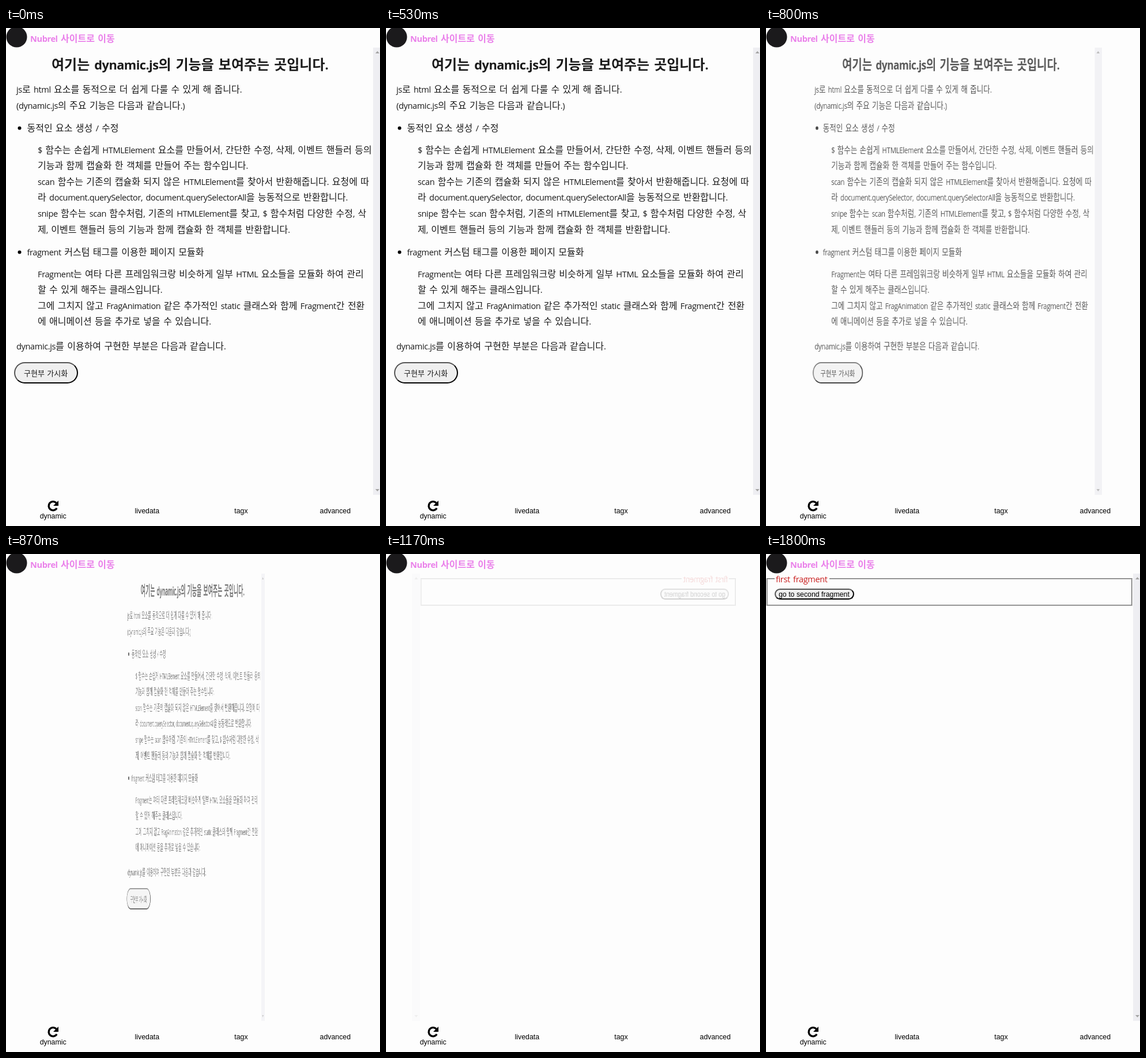
Write an HTML page that moves like this. It is 649 px wide and 863 px high and loops after 1830 ms.

```html
<!DOCTYPE html>
<html lang="ko">
<head>
<meta charset="utf-8">
<title>dynamic.js</title>
<style>
  html, body { margin: 0; width: 100%; height: 100%; overflow: hidden; background: #fdfdfd; }
  body { position: relative; }
  svg { position: absolute; left: 0; top: 0; width: 653px; height: 863px; overflow: visible; }

  /* Hangul and spaces; Latin runs get their own font below */
  text { font: 16px "Noto Sans CJK KR", "Noto Sans CJK", sans-serif; word-spacing: .055em; fill: #1a1a1a; white-space: pre; }
  .latin { font-family: "Open Sans", "Noto Sans", sans-serif; font-size: .91em; letter-spacing: -.026em; }
  .title { font-size: 24px; font-weight: 700; }
  .link { font-weight: 700; fill: #ea80ea; }
  .legend { fill: #c81e1e; }
  .small { font-size: 13px; }
  .ui { font: 12.35px "Liberation Sans", Arial, sans-serif; word-spacing: 0; fill: #000; }
  .nav { text-anchor: middle; }

  .page { position: absolute; left: 0; top: 0; width: 653px; height: 863px; }
  .intro { animation: turn-out 1830ms linear infinite, fade-out 1830ms linear infinite; }
  .fragment { animation: flip-in 1830ms linear infinite; }
  .box { position: absolute; box-sizing: border-box; }
  .button { border: 2px outset #000; background: #efefef; }
  .show { left: 14px; top: 579px; width: 111px; height: 37px; border-radius: 18.5px; }
  .go { left: 15px; top: 60px; width: 138px; height: 19px; border-radius: 9.5px; }
  .fieldset { left: 1px; top: 42px; width: 635px; height: 48px; border: 2px groove #c0c0c0; }
  .gap { left: 15px; top: 40px; width: 95px; height: 6px; background: #fdfdfd; }

  /* Half a turn without perspective */
  @keyframes turn-out {
    0%, 38.85% { transform: rotateY(0deg); }
    47.54% { transform: rotateY(67.5deg); }
    60.38%, 100% { transform: rotateY(180deg); }
  }
  @keyframes fade-out {
    0%, 37.7% { opacity: 1; }
    60.38%, 100% { opacity: 0; }
  }
  @keyframes flip-in {
    0%, 60.38% { transform: rotateY(180deg); opacity: 0; }
    81.69%, 100% { transform: rotateY(0deg); opacity: 1; }
  }
</style>
</head>
<body>
<svg>
  <defs>
    <g id="scrollbar">
      <rect x="637" y="34" width="16" height="775" fill="#eeeef2"/>
      <path d="M641 44h7l-3.5-4zM641 799h7l-3.5 4z" fill="#a3a3a3"/>
    </g>
  </defs>
  <circle cx="18.5" cy="15.5" r="18" fill="#1b1a1c"/>
  <text class="link mixed" x="42" y="24">Nubrel 사이트로 이동</text>

  <path d="M88.2 832.2A7.6 7.6 0 1 1 87.2 823" fill="none" stroke="#000" stroke-width="3.4"/>
  <path d="M91 819v9h-9z"/>
  <text class="ui nav" x="81.7" y="850">dynamic</text>
  <text class="ui nav" x="244.8" y="841">livedata</text>
  <text class="ui nav" x="408" y="841">tagx</text>
  <text class="ui nav" x="571.3" y="841">advanced</text>
</svg>

<div class="page intro">
  <div class="box button show"></div>
  <svg>
    <use href="#scrollbar"/>
    <text class="title mixed" x="79" y="72">여기는 dynamic.js의 기능을 보여주는 곳입니다.</text>
    <text class="mixed" x="18" y="112">js로 html 요소를 동적으로 더 쉽게 다룰 수 있게 해 줍니다.</text>
    <text class="mixed" x="18" y="139.5">(dynamic.js의 주요 기능은 다음과 같습니다.)</text>

    <circle cx="23.5" cy="173.5" r="3"/>
    <text class="mixed" x="36.5" y="178.5">동적인 요소 생성 / 수정</text>
    <text class="mixed" x="55" y="216.5">$ 함수는 손쉽게 HTMLElement 요소를 만들어서, 간단한 수정, 삭제, 이벤트 핸들러 등의</text>
    <text class="mixed" x="55" y="244">기능과 함께 캡슐화 한 객체를 만들어 주는 함수입니다.</text>
    <text class="mixed" x="55" y="271.5">scan 함수는 기존의 캡슐화 되지 않은 HTMLElement를 찾아서 반환해줍니다. 요청에 따</text>
    <text class="mixed" x="55" y="299">라 document.querySelector, document.querySelectorAll을 능동적으로 반환합니다.</text>
    <text class="mixed" x="55" y="327">snipe 함수는 scan 함수처럼, 기존의 HTMLElement를 찾고, $ 함수처럼 다양한 수정, 삭</text>
    <text class="mixed" x="55" y="354.5">제, 이벤트 핸들러 등의 기능과 함께 캡슐화 한 객체를 반환합니다.</text>

    <circle cx="23.5" cy="388.5" r="3"/>
    <text class="mixed" x="36.5" y="393.5">fragment 커스텀 태그를 이용한 페이지 모듈화</text>
    <text class="mixed" x="55" y="431.5">Fragment는 여타 다른 프레임워크랑 비슷하게 일부 HTML 요소들을 모듈화 하여 관리</text>
    <text class="mixed" x="55" y="459">할 수 있게 해주는 클래스입니다.</text>
    <text class="mixed" x="55" y="486.5">그에 그치지 않고 FragAnimation 같은 추가적인 static 클래스와 함께 Fragment간 전환</text>
    <text class="mixed" x="55" y="514">에 애니메이션 등을 추가로 넣을 수 있습니다.</text>

    <text class="mixed" x="18" y="556.5">dynamic.js를 이용하여 구현한 부분은 다음과 같습니다.</text>
    <text class="small" x="31" y="602.5">구현부 가시화</text>
  </svg>
</div>

<div class="page fragment">
  <div class="box fieldset"></div>
  <div class="box gap"></div>
  <div class="box button go"></div>
  <svg>
    <use href="#scrollbar"/>
    <text class="legend mixed" x="17" y="49">first fragment</text>
    <text class="ui" x="22" y="74">go to second fragment</text>
  </svg>
</div>

<script>
  // Set Latin runs in the companion font
  for (const line of document.querySelectorAll('.mixed')) {
    line.innerHTML = line.textContent.replace(/[!-~]+/g, '<tspan class="latin">$&</tspan>');
  }
</script>
</body>
</html>
```
